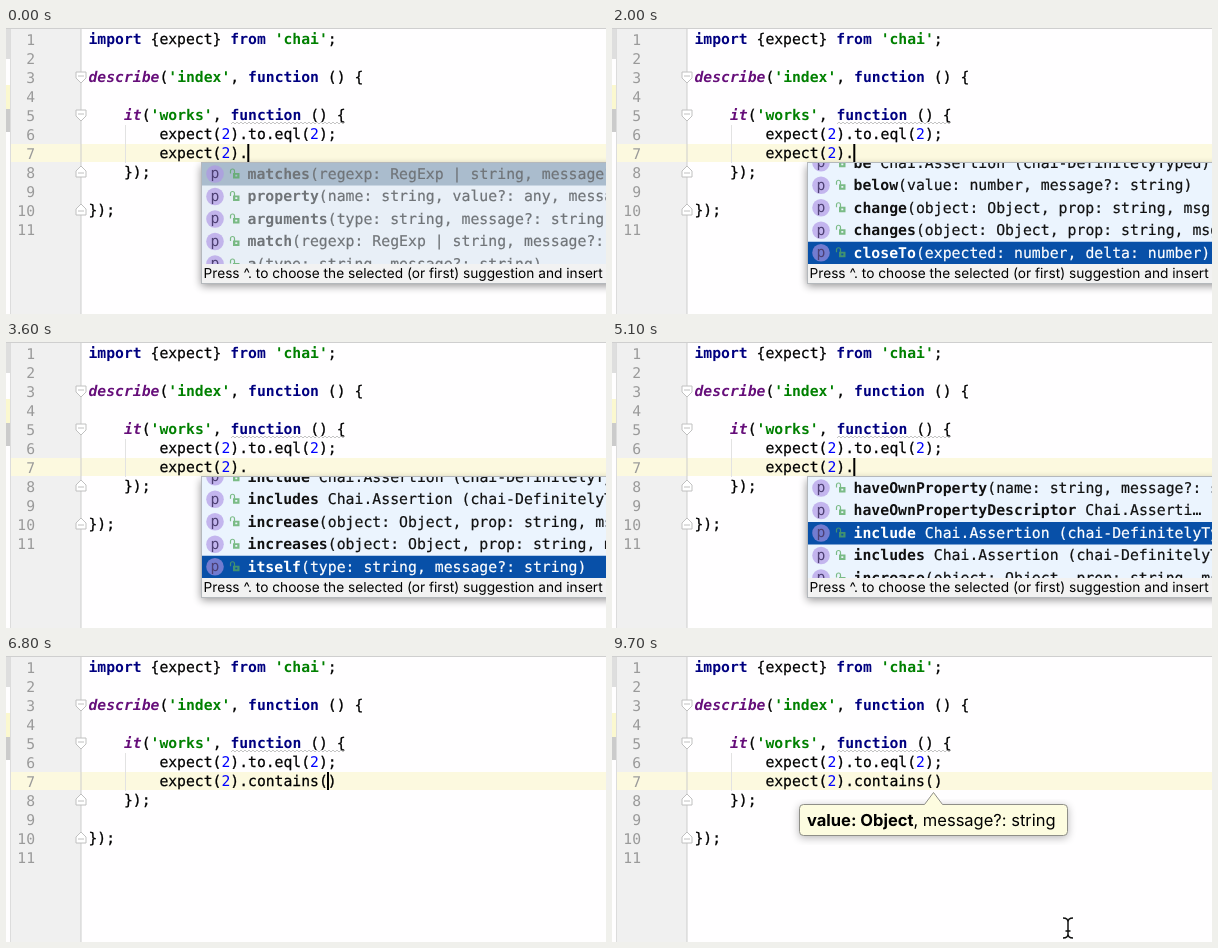
These frames come from a looping animation (600 by 286 pixels, 9.8 s). An HTML page:

```html
<!DOCTYPE html>
<html lang="en">
<head>
<meta charset="utf-8">
<title>Code completion</title>
<style>
html, body { margin: 0; width: 100%; height: 100%; overflow: hidden; background: #fff; }
svg { display: block; width: 600px; height: 286px; }
text { font: 14.72px "DejaVu Sans Mono", monospace; white-space: pre; text-rendering: geometricPrecision; }
#code text { stroke: #000; stroke-width: .25; }
#code tspan[class] { stroke: none; }
.kw { fill: #000080; font-weight: bold; }
.fn { fill: #660e7a; font-weight: bold; font-style: italic; }
.str { fill: #008000; font-weight: bold; }
.num { fill: #0000ff; }
.b { font-weight: bold; }
#numbers text { fill: #9a9a9a; text-anchor: end; }
#folds path { fill: #fff; stroke: #c0c0c0; }
#list .label { font-size: 14.82px; fill: #111; stroke: #111; stroke-width: .2; }
#list .picked .label { fill: #fff; stroke: #fff; }
#list.idle .label { fill: #707478; stroke: #707478; }
#list .b { stroke: none; }
#hint { font: 13.7px Inter, sans-serif; }
#tip text { font: 16.5px Inter, sans-serif; }
#tip .b { font-weight: bold; }
</style>
</head>
<body>
<svg viewBox="0 0 600 286">
  <defs>
    <clipPath id="view"><rect x="196" y="135" width="404" height="101"/></clipPath>
    <filter id="blur" x="-10%" y="-20%" width="120%" height="140%"><feGaussianBlur stdDeviation="4"/></filter>
    <g id="icon">
      <circle cx="209" cy="11" r="8.8" fill="#ad93e5" fill-opacity=".65"/>
      <text x="204.6" y="15.3" style="fill:#4d3f73">p</text>
      <g opacity=".75">
        <path d="M224.5 10.5V8a2 2 0 0 1 4 0V10.5" fill="none" stroke="#55a85e" stroke-width="1.2"/>
        <path d="M227 10H233.5V15.5H227ZM229.3 11.8V13.6H231.3V11.8Z" fill="#55a85e" fill-rule="evenodd"/>
      </g>
    </g>
  </defs>

  <rect width="600" height="286" fill="#fffeff"/>
  <rect x="5" width="70" height="286" fill="#f0f0f0"/>
  <rect width="4" height="31" fill="#dedede"/>
  <rect y="57" width="4" height="24" fill="#fbf8cf"/>
  <rect y="81" width="4" height="23" fill="#cbcbcb"/>
  <rect x="4" width="1" height="286" fill="#dcdcdc"/>
  <rect x="5" y="116" width="595" height="18" fill="#fcf9df"/>
  <path d="M75 0V286" stroke="#cdcdcd"/>
  <path d="M0 .5H600" stroke="#cfcfcf"/>
  <path d="M119.5 97V135" stroke="#e2e2e2"/>
  <path id="wave" fill="none" stroke="#c4c4c4"/>
  <g id="numbers"></g>
  <g id="folds"></g>

  <g id="code">
    <text x="82.5" y="16"><tspan class="kw">import</tspan> {expect} <tspan class="kw">from</tspan> <tspan class="str">'chai'</tspan>;</text>
    <text x="82.5" y="54"><tspan class="fn">describe</tspan>(<tspan class="str">'index'</tspan>, <tspan class="kw">function</tspan> () {</text>
    <text x="118" y="92"><tspan class="fn">it</tspan>(<tspan class="str">'works'</tspan>, <tspan class="kw">function</tspan> () {</text>
    <text x="153.4" y="111">expect(<tspan class="num">2</tspan>).to.eql(<tspan class="num">2</tspan>);</text>
    <text x="153.4" y="130">expect(<tspan class="num">2</tspan>).<tspan id="typed"></tspan></text>
    <text x="118" y="149">});</text>
    <text x="82.5" y="187">});</text>
  </g>
  <rect id="caret" y="116" width="2" height="18"/>

  <g id="popup">
    <rect x="195" y="138" width="430" height="120" fill="#000" opacity=".42" filter="url(#blur)"/>
    <rect x="195.5" y="134.5" width="420" height="121" fill="#f2f2f2" stroke="#b4b8bc"/>
    <g clip-path="url(#view)">
      <rect id="paper" x="196" y="135" width="404" height="101"/>
      <g id="list"><rect id="bar" x="196" width="404" height="22.5"/></g>
    </g>
    <text id="hint" x="197.5" y="250">Press ^. to choose the selected (or first) suggestion and insert</text>
  </g>

  <g id="tip">
    <rect x="187" y="150" width="269" height="32" rx="4" opacity=".28" filter="url(#blur)"/>
    <path d="M191.5 148.5H312.5L321.5 136.5L330.5 148.5H451.5a4 4 0 0 1 4 4V175.5a4 4 0 0 1-4 4H191.5a4 4 0 0 1-4-4V152.5a4 4 0 0 1 4-4z" fill="#fdfce0" stroke="#8f8f88"/>
    <text x="195" y="169.5"><tspan class="b">value: Object</tspan>, message?: string</text>
  </g>

  <g id="mouse" fill="none">
    <path class="beam" stroke="#fff" stroke-width="3.4"/>
    <path class="beam" stroke="#111" stroke-width="1.5"/>
  </g>
</svg>
<script>
const LOOP = 9800, STEP = 100, ROW = 22.5, LIST_TOP = 135;
const TURN = 4400, ACCEPT = 6800, TIP = 7600, MOUSE = 9400;
const $ = id => document.getElementById(id);

function add(parent, tag, attrs, content = '') {
  const el = document.createElementNS('http://www.w3.org/2000/svg', tag);
  for (const key in attrs) el.setAttribute(key, attrs[key]);
  el.innerHTML = content;
  return parent.appendChild(el);
}

// Editor gutter
for (let n = 1; n <= 11; n++) add($('numbers'), 'text', { x: 29, y: 19 * n - 2.5 }, n);
for (const [line, dir] of [[3, 1], [5, 1], [8, -1], [10, -1]]) {
  add($('folds'), 'path', {
    d: 'M-5-5H5V1L0 6L-5 1ZM-3-1H3',
    transform: `translate(75 ${19 * line - 8}) scale(1 ${dir})`
  });
}
let zigzag = 'M225 96';
for (let x = 227, up = true; x <= 340; x += 2, up = !up) zigzag += `L${x} ${up ? 94 : 96}`;
$('wave').setAttribute('d', zigzag);

const beam = 'M-5-10Q0-10 0-6Q0-10 5-10M0-7V7M-5 10Q0 10 0 6Q0 10 5 10M-2.5 3H2.5';
document.querySelectorAll('.beam').forEach(path => path.setAttribute('d', beam));

// Suggestions as name:signature; without a letter the signature is t
const signatures = {
  t: '(type: string, message?: string)',
  v: '(value: any, message?: string)',
  n: '(value: number, message?: string)',
  o: '(object: Object, prop: string, msg: string)',
  r: '(regexp: RegExp | string, message?: string)',
  p: '(name: string, value?: any, message?: string)',
  h: '(name: string, message?: string)',
  d: '(expected: number, delta: number)',
  c: ' Chai.Assertion (chai-DefinitelyTyped)',
  e: ' Chai.Asserti…'
};
const names = `matches:r property:p arguments match:r a above:n all:c an any:c
  approximately:d be:c below:n change:o changes:o closeTo:d contain:c contains:c
  decrease:o decreases:o deep:c empty eq:v eql:v eqls:v equal:v equals:v exist
  extensible false frozen greaterThan:n gt:n gte:n have:c haveOwnProperty:h
  haveOwnPropertyDescriptor:e include:c includes:c increase:o increases:o itself
  keys:c least:n length:c lengthOf:n lessThan:n lt:n lte:n members:c most:n not:c`;
const rows = names.split(/\s+/).map((entry, i) => {
  const [name, kind = 't'] = entry.split(':');
  return add($('list'), 'g', { transform: `translate(0 ${i * ROW})` },
    `<use href="#icon"/><text class="label" x="241.5" y="15.8"><tspan class="b">${name}</tspan>${signatures[kind]}</text>`);
});

// Time and selected row
const keys = [[0, 0], [1000, 0], [1500, 3], [2700, 29], [3600, 40], [4200, 48],
  [4500, 48], [5100, 36], [6100, 16], [LOOP, 16]];

function along(t) {
  const k = keys.findIndex(key => key[0] > t);
  const [t0, a] = keys[k - 1], [t1, b] = keys[k];
  return Math.round(a + (b - a) * (t - t0) / (t1 - t0));
}

const show = (id, on) => $(id).setAttribute('visibility', on ? 'visible' : 'hidden');

function drawPopup(t) {
  const pick = along(t), idle = pick === 0;
  const top = t < TURN ? Math.max(0, pick - 3.5) : Math.min(44.5, pick - 2);
  $('list').setAttribute('transform', `translate(0 ${LIST_TOP - top * ROW})`);
  $('list').classList.toggle('idle', idle);
  $('paper').setAttribute('fill', idle ? '#e8eff7' : '#ebf4fe');
  $('bar').setAttribute('y', pick * ROW);
  $('bar').setAttribute('fill', idle ? '#aabccd' : '#0850a8');
  rows.forEach((row, i) => row.classList.toggle('picked', i === pick));
}

function draw(t) {
  const done = t >= ACCEPT;
  $('typed').textContent = done ? 'contains()' : '';
  $('caret').setAttribute('x', done ? 321 : 241.3);
  show('caret', (done ? t - ACCEPT : t) % 1000 < 500);
  show('popup', !done);
  show('tip', t >= TIP);
  show('mouse', t >= MOUSE);
  if (!done) drawPopup(t);
  const p = Math.min(1, Math.max(0, (t - MOUSE) / 300));
  const ease = 1 - (1 - p) ** 2;
  $('mouse').setAttribute('transform', `translate(${516 - 60 * ease} ${268 + 4 * ease})`);
}

let last = -1;
function tick() {
  const t = Math.floor(performance.now() % LOOP / STEP) * STEP;
  if (t !== last) draw(last = t);
  requestAnimationFrame(tick);
}
tick();
</script>
</body>
</html>
```
